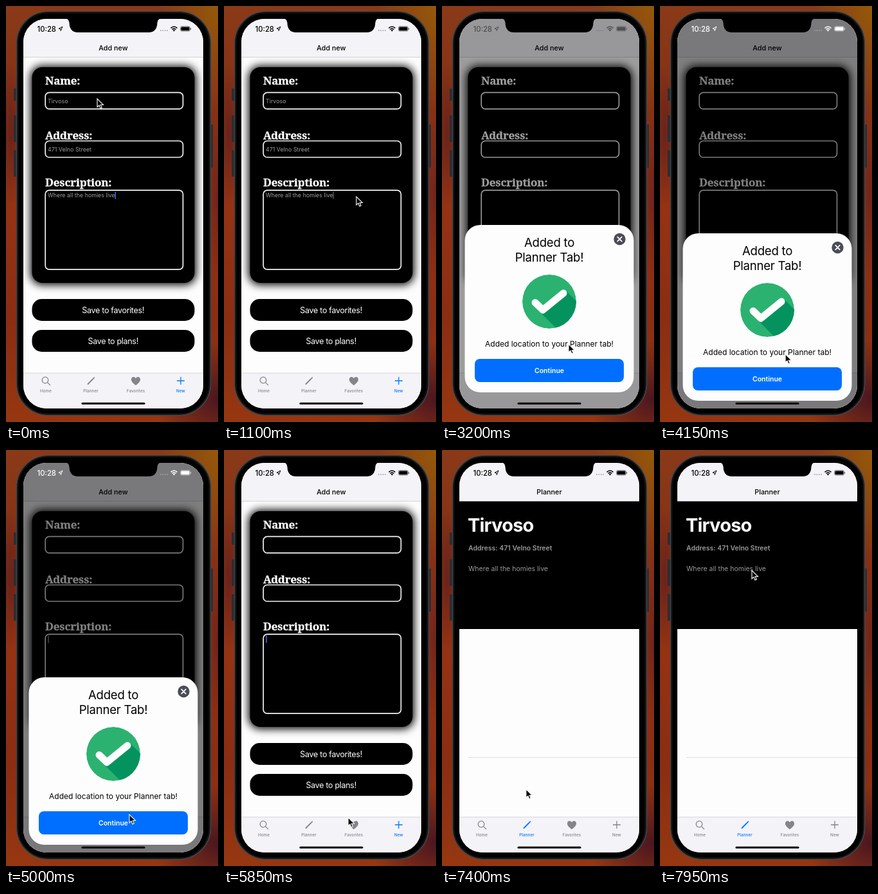
Write an HTML page that moves like this. It is 330 by 646 pixels and loops after 8000 ms.

```html
<!DOCTYPE html>
<html lang="en">
<head>
<meta charset="utf-8">
<title>Planner app</title>
<style>
html, body { margin: 0; width: 100%; height: 100%; overflow: hidden; background: #8c3414; }
svg { display: block; width: 100%; height: 100%; font-family: Inter, Roboto, sans-serif; }
.mid { text-anchor: middle; }
.slab { font: 900 17px "Noto Serif", serif; letter-spacing: -.2px; fill: #fff; stroke: #fff; stroke-width: .3; }
.entry { font-size: 8.9px; fill: #9c9c9c; }
.field { fill: none; stroke: #f2f2f2; stroke-width: 1.7; }
.btn { font-size: 12.6px; letter-spacing: -.35px; fill: #fff; }
.empty { font: 18.8px "Open Sans", sans-serif; fill: #99999e; }
.tab { color: #858589; }
.tab.on { color: #007aff; }
.tab text { font-size: 6.3px; font-weight: 500; letter-spacing: .1px; fill: currentColor; }
.line { fill: none; stroke: currentColor; stroke-width: 1.3; stroke-linecap: round; }
</style>
</head>
<body>
<svg viewBox="0 0 330 646" preserveAspectRatio="none">
  <defs>
    <linearGradient id="base" x2="0" y2="1">
      <stop offset="0" stop-color="#8a3a18"/>
      <stop offset=".25" stop-color="#853015"/>
      <stop offset=".5" stop-color="#953214"/>
      <stop offset=".75" stop-color="#8a2d12"/>
      <stop offset="1" stop-color="#963711"/>
    </linearGradient>
    <radialGradient id="amber"><stop stop-color="#94580a"/><stop offset="1" stop-color="#94580a" stop-opacity="0"/></radialGradient>
    <radialGradient id="dusk"><stop stop-color="#4a1620"/><stop offset="1" stop-color="#4a1620" stop-opacity="0"/></radialGradient>
    <filter id="blur" x="-20%" y="-20%" width="140%" height="140%"><feGaussianBlur stdDeviation="6.5"/></filter>
    <clipPath id="screen"><rect x="27" y="20" width="280" height="605" rx="36"/></clipPath>
    <clipPath id="disc"><circle cx="167" cy="119" r="42"/></clipPath>
  </defs>

  <rect width="330" height="646" fill="url(#base)"/>
  <ellipse cx="330" cy="0" rx="90" ry="170" fill="url(#amber)"/>
  <ellipse cx="330" cy="610" rx="100" ry="90" fill="url(#dusk)"/>
  <ellipse cx="330" cy="300" rx="24" ry="130" fill="url(#dusk)" opacity=".5"/>
  <ellipse cx="8" cy="200" rx="22" ry="110" fill="url(#dusk)" opacity=".5"/>

  <path d="M14 128V147M14 170V211M14 224V265M320 184V251" stroke="#292d32" stroke-width="4"/>
  <rect x="16.5" y="8.5" width="302" height="627" rx="49" fill="#000" stroke="#42474b" stroke-width="1.6"/>
  <rect x="18.5" y="10.5" width="298" height="623" rx="47" fill="none" stroke="#17191b" stroke-width="1.5"/>

  <g clip-path="url(#screen)">
    <rect x="27" y="20" width="280" height="605" fill="#fdfdfe"/>

    <g id="formPage">
      <rect x="38" y="93" width="258" height="340" rx="18" filter="url(#blur)"/>
      <rect x="40.5" y="95" width="253" height="335" rx="16"/>
      <text class="slab" x="61" y="122">Name:</text>
      <text class="slab" x="61" y="207">Address:</text>
      <text class="slab" x="61" y="280">Description:</text>
      <rect class="field" x="61.2" y="134.3" width="214.3" height="25.5" rx="6"/>
      <rect class="field" x="61.2" y="209.5" width="214.3" height="25.5" rx="6"/>
      <rect class="field" x="61.2" y="286.2" width="214.3" height="123" rx="6"/>
      <g id="entries" class="entry">
        <text x="65" y="151">Tirvoso</text>
        <text x="65" y="226.3">471 Velno Street</text>
        <text x="65" y="297">Where all the homies live</text>
      </g>
      <rect id="caret" y="288.5" width="1.5" height="11"/>
      <rect x="40.5" y="455" width="253" height="34" rx="15"/>
      <rect x="40.5" y="503" width="253" height="34" rx="15"/>
      <text class="btn mid" x="166.7" y="476.5">Save to favorites!</text>
      <text class="btn mid" x="166.7" y="524.5">Save to plans!</text>
    </g>

    <g id="favPage" class="empty mid">
      <text x="167" y="317.5">Add your favorite locations</text>
      <text x="167" y="340">through the add new screen!</text>
    </g>

    <g id="planPage">
      <rect x="27" y="79" width="280" height="199"/>
      <text x="40" y="127" font-size="29" font-weight="700" letter-spacing="-.8" fill="#fff">Tirvoso</text>
      <g fill="#98989c" font-size="10.5">
        <text x="41" y="156" font-weight="600">Address: 471 Velno Street</text>
        <text x="41" y="188">Where all the homies live</text>
      </g>
      <path d="M41 477.5H307" stroke="#dfdfe2"/>
    </g>

    <rect x="27" y="20" width="280" height="59" fill="#f4f3f7"/>
    <path d="M27 79.5H307" stroke="#c9c9ce" stroke-width=".8"/>
    <text id="title" class="mid" x="167" y="69" font-size="10.8" font-weight="500"></text>

    <rect x="27" y="570" width="280" height="55" fill="#f4f3f7"/>
    <path d="M27 570H307" stroke="#cfcfd3" stroke-width=".8"/>
    <g class="tab mid" transform="translate(62 582)">
      <g class="line"><circle cx="-1" cy="-1" r="4.8"/><path d="M2.6 2.6L6.5 6.5"/></g>
      <text y="17.5">Home</text>
    </g>
    <g class="tab mid" transform="translate(132 582)">
      <path class="line" d="M-4.5 5L3-2.5M4.2-3.7L5.3-4.8" style="stroke-width:1.9"/>
      <text y="17.5">Planner</text>
    </g>
    <g class="tab mid" transform="translate(202 582)">
      <path fill="currentColor" d="M0 7C-4 4-7 1.5-7-2C-7-6.5-1.8-7.2 0-3.5C1.8-7.2 7-6.5 7-2C7 1.5 4 4 0 7Z"/>
      <text y="17.5">Favorites</text>
    </g>
    <g class="tab mid" transform="translate(272 582)">
      <path class="line" d="M-5.5 0H5.5M0-5.5V5.5"/>
      <text y="17.5">New</text>
    </g>
    <rect x="117.5" y="615.7" width="99" height="3" rx="1.5"/>

    <rect id="dim" x="27" y="20" width="280" height="605"/>

    <g id="status">
      <text x="48.5" y="39.5" font-size="11.3" font-weight="500">10:28</text>
      <path d="M82 35.2L88 32L85.2 38.5L84.8 35.6Z" fill="none" stroke="currentColor"/>
      <path d="M240 38H252" stroke="currentColor" stroke-width="1.8" stroke-dasharray="1.8 1.6" opacity=".25"/>
      <g fill="none" stroke="currentColor" stroke-width="1.6">
        <path d="M256.5 34.3Q261.5 29.7 266.5 34.3M258.4 36.5Q261.5 33.8 264.6 36.5"/>
      </g>
      <circle cx="261.5" cy="38" r="1.3"/>
      <rect x="271.5" y="31.6" width="15" height="7.6" rx="2.2" fill="none" stroke="currentColor" stroke-width=".7" opacity=".6"/>
      <rect x="272.4" y="32.5" width="13.2" height="5.8" rx="1.4"/>
      <path d="M287.7 34V37" stroke="currentColor" opacity=".6"/>
    </g>

    <g id="sheet">
      <rect x="35.5" width="263" height="260" rx="24" fill="#fdfdfe"/>
      <g class="mid" font-size="18.6" letter-spacing="-.25">
        <text x="167" y="34">Added to</text>
        <text x="167" y="57">Planner Tab!</text>
      </g>
      <circle cx="276.5" cy="22" r="9.2" fill="#4b4c55"/>
      <path d="M273.2 18.7L279.8 25.3M279.8 18.7L273.2 25.3" stroke="#fff" stroke-width="1.7" stroke-linecap="round"/>
      <g clip-path="url(#disc)">
        <circle cx="167" cy="119" r="42" fill="#2bb270"/>
        <path d="M141 124L158 138L194 103L244 153L208 190Z" fill="#04935f"/>
      </g>
      <path d="M145 120.5L157 132L189 106" fill="none" stroke="#fff" stroke-width="11" stroke-linecap="round" stroke-linejoin="round"/>
      <text class="mid" x="167" y="189" font-size="12">Added location to your Planner tab!</text>
      <rect x="51" y="208" width="232" height="36" rx="8" fill="#006fff"/>
      <text class="mid" x="167" y="230" font-size="10.5" font-weight="600" fill="#fff">Continue</text>
    </g>
  </g>

  <path d="M92 19Q98 20 98.5 26Q99 41 112 41H222Q235 41 235.5 26Q236 20 242 19Z"/>
  <path id="cursor" d="M0 0V13L3 10.2L5 15L7.3 14L5.3 9.5H9.5Z" stroke="#fff" stroke-width="1.1"/>
</svg>
<script>
const LOOP = 8000, STEP = 50;
const $ = id => document.getElementById(id);
const tabs = [...document.querySelectorAll('.tab')];
const show = (el, on) => el.style.display = on ? '' : 'none';

const smooth = u => u * u * (3 - 2 * u);
const easeOut = u => 1 - (1 - u) ** 3;

// Interpolates rows of [time, ...values].
function track(rows, t, ease = smooth) {
  const i = rows.findIndex(r => r[0] > t);
  if (i < 0) return rows[rows.length - 1].slice(1);
  if (i === 0) return rows[0].slice(1);
  const a = rows[i - 1], b = rows[i];
  const k = ease((t - a[0]) / (b[0] - a[0]));
  return a.slice(1).map((v, j) => v + (b[j + 1] - v) * k);
}

const pointer = [
  [100, 142, 144], [1100, 206, 296], [2200, 197, 523], [2700, 197, 523],
  [3200, 197, 525], [3750, 197, 525], [4700, 192, 566], [5550, 192, 566],
  [6250, 195, 578], [6550, 195, 578], [7000, 129, 580], [7250, 129, 580],
  [7900, 143, 187]
];
const rise = [[2700, 640], [3200, 340]];
const settle = [[3200, 340], [3600, 342], [4150, 353], [5300, 353], [5350, 366], [5550, 366], [5850, 640]];
const shade = [[2700, 0], [3200, .38], [3400, .5], [5300, .5], [5350, .42], [5550, .42], [5850, 0]];
const light = [[2900, 0], [3200, 80], [3400, 255], [5300, 255], [5350, 220], [5550, 220], [5850, 0]];

// Caret fades out early in each second and returns at its middle.
function blink(t) {
  const p = t % 1000;
  if (p < 50 || p >= 500) return 1;
  if (p < 150) return 1 - (p - 50) / 130;
  return p < 400 ? 0 : (p - 400) / 100;
}

function draw(t) {
  const page = t < 6350 ? 3 : t < 7200 ? 2 : 1;
  show($('formPage'), page === 3);
  show($('favPage'), page === 2);
  show($('planPage'), page === 1);
  tabs.forEach((tab, i) => tab.classList.toggle('on', i === page));
  $('title').textContent = ['Home', 'Planner', 'Favorites', 'Add new'][page];

  const saved = t >= 2750, modal = saved && t < 5550;
  show($('entries'), !saved);
  const caret = $('caret');
  caret.setAttribute('x', saved ? 65.3 : 169.5);
  caret.setAttribute('fill', modal || blink(t) < 1 ? '#888' : '#3a6fe8');
  caret.setAttribute('opacity', blink(t));

  const [y] = t < 3200 ? track(rise, t, easeOut) : track(settle, t);
  $('sheet').setAttribute('transform', `translate(0 ${y})`);
  $('dim').setAttribute('opacity', track(shade, t)[0]);
  const v = Math.round(track(light, t)[0]);
  $('status').style.color = $('status').style.fill = `rgb(${v},${v},${v})`;
  $('cursor').setAttribute('transform', `translate(${track(pointer, t)})`);
}

const start = performance.now();
function tick() {
  const t = (performance.now() - start) % LOOP;
  draw(Math.floor(t / STEP) * STEP);
  requestAnimationFrame(tick);
}
tick();
</script>
</body>
</html>
```
